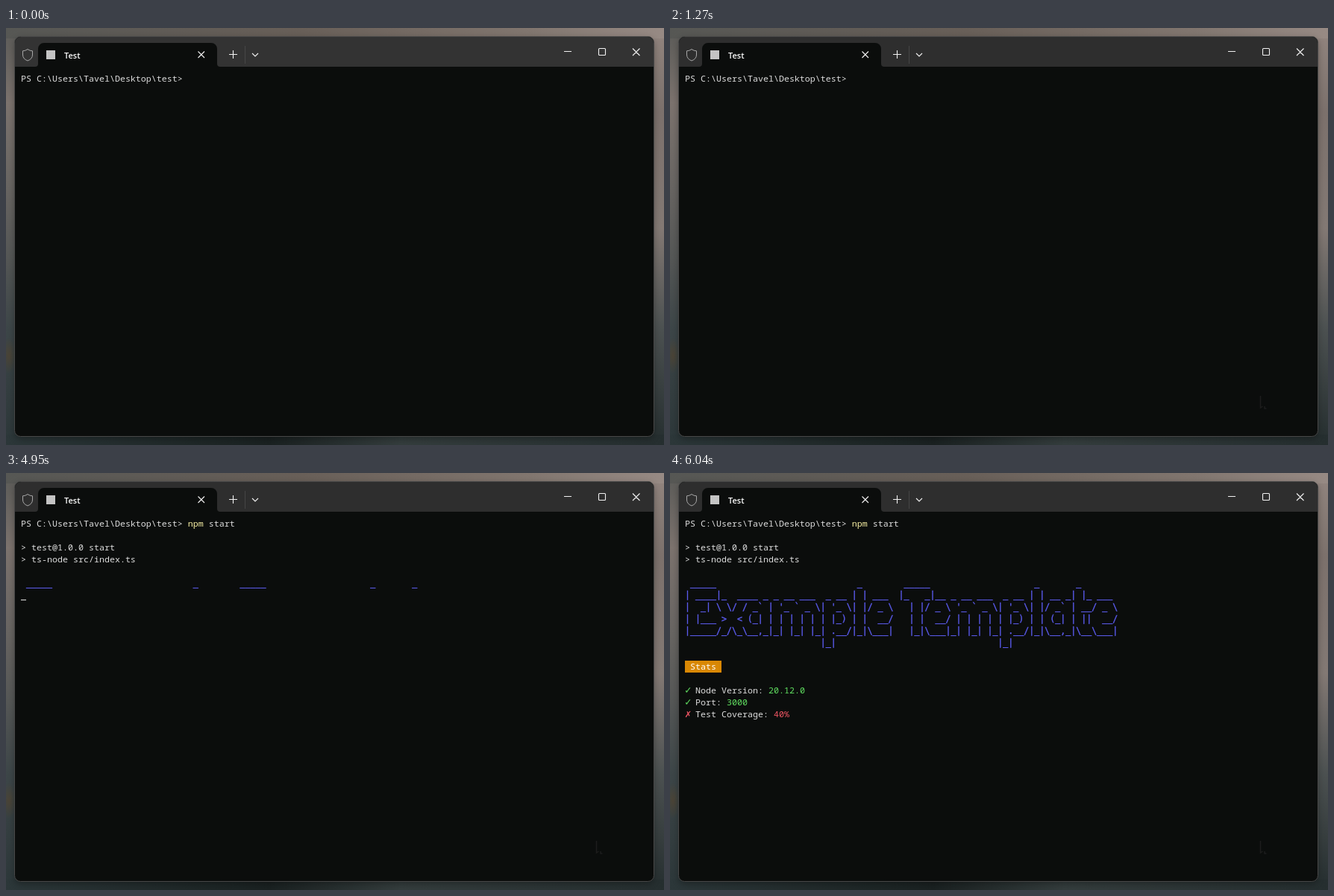
An HTML page for the animation above (6190 ms loop, 882x560 px).

```html
<!DOCTYPE html>
<html lang="en">
<head>
<meta charset="utf-8">
<title>Terminal</title>
<style>
  html, body { margin: 0; width: 100%; height: 100%; overflow: hidden; background: #333; }
  svg { display: block; }
  #screen text { font: 11.6667px "Noto Sans Mono", "DejaVu Sans Mono", monospace; white-space: pre; fill: #dedede; }
  #screen .art { font: 11.627px "DejaVu Sans Mono", monospace; fill: #5c5cf0; stroke: #5c5cf0; stroke-width: .35; }
  .cmd { fill: #f9f1a5; }
  .hint { fill: #5c5c5c; }
  .good { fill: #61e061; }
  .bad { fill: #ee5563; }
  .mark { font: 14px "DejaVu Sans Mono", monospace; }
  .tab { font: 600 11px "Open Sans", "Noto Sans", sans-serif; fill: #fff; }
</style>
</head>
<body>
<svg width="882" height="560" viewBox="0 0 882 560">
  <defs>
    <linearGradient id="left" x2="0" y2="1">
      <stop offset="0" stop-color="#5a5a57"/>
      <stop offset=".18" stop-color="#7c736e"/>
      <stop offset=".38" stop-color="#686562"/>
      <stop offset=".55" stop-color="#555756"/>
      <stop offset=".72" stop-color="#3d4648"/>
      <stop offset="1" stop-color="#2c3739"/>
    </linearGradient>
    <linearGradient id="right" x2="0" y2="1">
      <stop offset="0" stop-color="#92857f"/>
      <stop offset=".2" stop-color="#7c716c"/>
      <stop offset=".48" stop-color="#837974"/>
      <stop offset=".72" stop-color="#4c5151"/>
      <stop offset="1" stop-color="#252e2f"/>
    </linearGradient>
    <linearGradient id="sky">
      <stop offset="0" stop-color="#565754"/>
      <stop offset=".45" stop-color="#685f58"/>
      <stop offset=".8" stop-color="#81766f"/>
      <stop offset="1" stop-color="#978a84"/>
    </linearGradient>
    <linearGradient id="ground">
      <stop offset="0" stop-color="#2c3739"/>
      <stop offset=".3" stop-color="#1e2727"/>
      <stop offset=".4" stop-color="#1a2121"/>
      <stop offset=".6" stop-color="#343d3d"/>
      <stop offset="1" stop-color="#252e2f"/>
    </linearGradient>
    <radialGradient id="leaves">
      <stop offset="0" stop-color="#57452c" stop-opacity=".6"/>
      <stop offset="1" stop-color="#57452c" stop-opacity="0"/>
    </radialGradient>
    <filter id="soft" x="-5%" y="-5%" width="110%" height="110%"><feGaussianBlur stdDeviation="5"/></filter>
  </defs>

  <!-- wallpaper -->
  <rect width="441" height="560" fill="url(#left)"/>
  <rect x="441" width="441" height="560" fill="url(#right)"/>
  <rect width="882" height="14" fill="url(#sky)"/>
  <rect y="546" width="882" height="14" fill="url(#ground)"/>
  <ellipse cx="4" cy="440" rx="10" ry="24" fill="url(#leaves)"/>
  <rect x="12" y="15" width="856" height="536" rx="8" opacity=".35" filter="url(#soft)"/>

  <!-- window -->
  <rect x="11.5" y="11.5" width="857" height="537" rx="8" fill="#0b0d0c" stroke="#484848"/>
  <path id="bar" d="M12 52V20a8 8 0 0 1 8-8H860a8 8 0 0 1 8 8V52Z"/>
  <path d="M39 52q4 0 4-4V28a8 8 0 0 1 8-8H275a8 8 0 0 1 8 8V48q0 4 4 4Z" fill="#0b0d0c"/>
  <path d="M29 28.5q3 2.3 6.5 2.3V36q0 5.5-6.5 8Q22.5 41.5 22.5 36V30.8Q26 30.8 29 28.5Z" fill="none" stroke="#a8a8a8"/>
  <rect x="54" y="30" width="12" height="12" fill="#c4c4c4"/>
  <text class="tab" x="78" y="41">Test</text>
  <path d="M320.5 24V48" stroke="#464646"/>
  <g fill="none" stroke="#f2f2f2" stroke-width="1.1">
    <path d="M257.5 31.5l8.5 8.5m0-8.5l-8.5 8.500M299 35.5h11m-5.5-5.5v11M330 34l4 4 4-4M748 31.5h10M840 27.5l9.5 9.5m0-9.5l-9.5 9.5"/>
    <rect x="794.5" y="27.5" width="9" height="9" rx="1"/>
  </g>

  <g id="screen">
    <rect id="badge" x="20" y="252" width="49" height="16" fill="#d98804"/>
    <g id="lines">
      <text>PS C:\Users\Tavel\Desktop\test> <tspan class="cmd" id="cmd"></tspan><tspan id="arg"></tspan><tspan class="hint" id="hint"></tspan></text>
      <text></text>
      <text>> test@1.0.0 start</text>
      <text>> ts-node src/index.ts</text>
      <text></text>
      <text class="art"> _____                           _        _____                    _       _</text>
      <text class="art">| ____|_  ____ _ _ __ ___  _ __ | | ___  |_   _|__ _ __ ___  _ __ | | __ _| |_ ___</text>
      <text class="art">|  _| \ \/ / _` | '_ ` _ \| '_ \| |/ _ \   | |/ _ \ '_ ` _ \| '_ \| |/ _` | __/ _ \</text>
      <text class="art">| |___ >  &lt; (_| | | | | | | |_) | |  __/   | |  __/ | | | | | |_) | | (_| | ||  __/</text>
      <text class="art">|_____/_/\_\__,_|_| |_| |_| .__/|_|\___|   |_|\___|_| |_| |_| .__/|_|\__,_|\__\___|</text>
      <text class="art">                          |_|                               |_|</text>
      <text></text>
      <text style="fill:#fff"> Stats </text>
      <text></text>
      <text><tspan class="good mark">✓</tspan><tspan x="34">Node Version: </tspan><tspan class="good">20.12.0</tspan></text>
      <text><tspan class="good mark">✓</tspan><tspan x="34">Port: </tspan><tspan class="good">3000</tspan></text>
      <text><tspan class="bad mark">✗</tspan><tspan x="34">Test Coverage: </tspan><tspan class="bad">40%</tspan></text>
    </g>
    <rect id="caret" width="7" height="1"/>
  </g>

  <path id="smudge" d="M791.5 494v16l3-2M797 508v3h2.5" fill="none" stroke="#1d1d1c" stroke-width="1.5"/>
  <path id="mouse" d="M0 0V16L3.8 12.4 6.3 18.2 8.6 17.2 6.2 11.6H11Z" fill="#fff" stroke="#111" stroke-width=".6"/>
</svg>
<script>
const LOOP = 6190, COMMAND = 'npm start';
const keys = [1590, 1670, 1840, 1930, 2020, 2180, 2250, 2400, 2530];
const $ = id => document.getElementById(id);
const show = (el, on) => el.setAttribute('visibility', on ? 'visible' : 'hidden');
const lines = [...$('lines').children];

// When each line of output is printed
const lineTime = n => n < 2 ? 0 : n < 5 ? 4130
  : n < 13 ? 4950 + 31.4 * (n - 5) : 5170 + 42 * (n - 12);

lines.forEach((line, n) => {
  line.setAttribute('x', 20);
  line.setAttribute('y', 72 + 16 * n);
});

// [time, column, row, colour]; a bare time hides the caret
const carets = [
  [0], [20, 32, 0], [210, 32, 0, '#222'], [740, 32, 0], [1270],
  ...keys.map((t, i) => [t, 33 + i, 0]),
  [3160, 0, 1], [3710], [4240, 0, 5], [4750],
  ...lines.map((_, n) => [lineTime(n), 0, n + 1]).slice(5),
  [5870]
];

function drawCaret(t) {
  const [, col, row, colour = '#e4e4e4'] = carets.findLast(c => c[0] <= t);
  show($('caret'), col !== undefined);
  if (col === undefined) return;
  $('caret').setAttribute('x', 20 + 7 * col);
  $('caret').setAttribute('y', 74 + 16 * row);
  $('caret').setAttribute('fill', colour);
}

function drawCommand(t) {
  const typed = keys.filter(k => k <= t).length;
  const done = typed === COMMAND.length;
  $('cmd').textContent = COMMAND.slice(0, Math.min(typed, 3));
  $('arg').textContent = COMMAND.slice(3, Math.max(typed, 3));
  $('hint').textContent = done ? (t < 3110 ? 'r' : '') : t >= 1630 ? COMMAND.slice(typed) : '';
}

function drawMouse(t) {
  const step = Math.floor(t / 45) * 45;
  const away = t < 550 ? (1 - Math.max(0, step - 20) / 530) ** 2
    : t < 650 ? 0 : Math.min(1, (step - 605) / 215);
  show($('mouse'), t >= 20 && t < 820);
  $('mouse').setAttribute('transform',
    `translate(${Math.round(793 + 54 * away)} ${Math.round(490 + (t < 550 ? 75 : 54) * away)})`);
  show($('smudge'), t >= 820);
}

function frame(now) {
  const t = now % LOOP;
  lines.forEach((line, n) => show(line, t >= lineTime(n)));
  show($('badge'), t >= lineTime(12));
  $('bar').setAttribute('fill', t < 650 ? '#333' : '#2e2e2e');
  drawCommand(t);
  drawCaret(t);
  drawMouse(t);
  requestAnimationFrame(frame);
}
frame(0);
</script>
</body>
</html>
```
